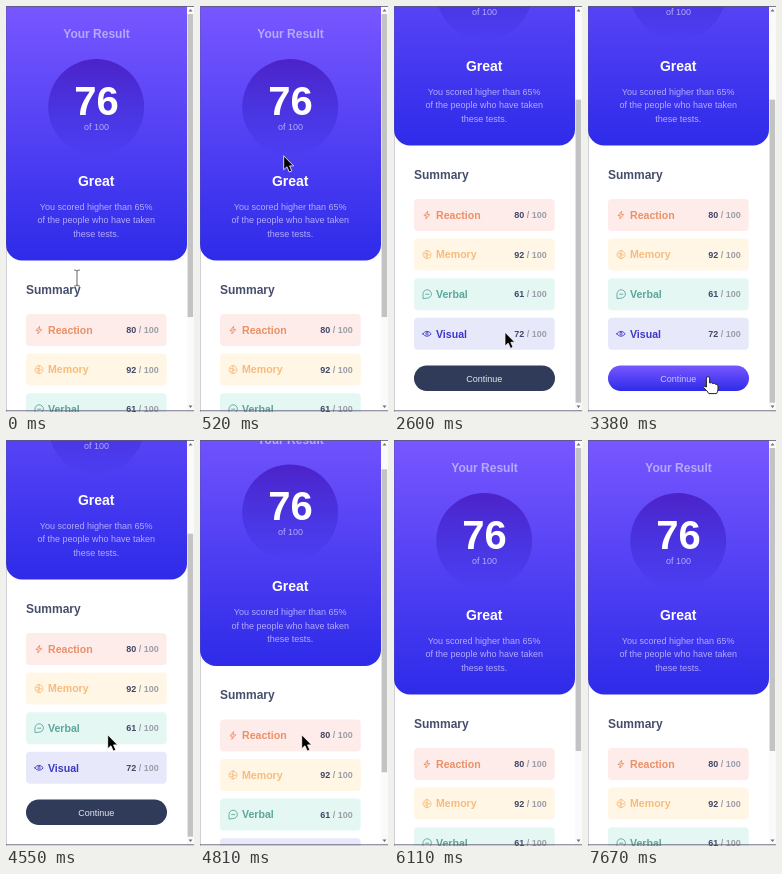
These frames come from a looping animation (188 by 406 pixels, 7.8 s). An HTML page:

```html
<!DOCTYPE html>
<html lang="en">
<head>
<meta charset="utf-8">
<title>Result summary</title>
<style>
  html, body { margin: 0; width: 100%; height: 100%; overflow: hidden; background: #fff; }
  svg { display: block; width: 100%; height: 100%; }
  text { font-family: "Liberation Sans", Arial, sans-serif; font-size: 9px; }
  .bold { font-weight: bold; }
  .mid { text-anchor: middle; }
  .soft { fill: #b3aaff; }
  .icon { fill: none; stroke-width: .9; stroke-linejoin: round; stroke-linecap: round; }
</style>
</head>
<body>
<svg viewBox="0 0 188 406" xmlns="http://www.w3.org/2000/svg">
  <defs>
    <linearGradient id="hero" x2="0" y2="1">
      <stop stop-color="#7857ff"/><stop offset="1" stop-color="#2e2be9"/>
    </linearGradient>
    <linearGradient id="disc" x2="0" y2="1">
      <stop stop-color="#4d22c9"/><stop offset="1" stop-color="#2521c9" stop-opacity="0"/>
    </linearGradient>
  </defs>

  <g id="page">
    <path d="M0 0H181V238.5a16 16 0 0 1-16 16H16a16 16 0 0 1-16-16Z" fill="url(#hero)"/>
    <text class="bold mid soft" x="90.5" y="32.3" style="font-size:12px">Your Result</text>
    <circle cx="90.2" cy="101" r="48" fill="url(#disc)"/>
    <text class="bold mid" x="90.4" y="108.5" fill="#fff" style="font-size:40px">76</text>
    <text class="mid soft" x="90.5" y="124">of 100</text>
    <text class="bold mid" x="90.2" y="179.8" fill="#fff" style="font-size:14px">Great</text>
    <g class="mid soft">
      <text x="90.2" y="204">You scored higher than 65%</text>
      <text x="90.2" y="217.3">of the people who have taken</text>
      <text x="90.2" y="230.8">these tests.</text>
    </g>
    <text class="bold" x="20" y="287.5" fill="#454e6b" style="font-size:12px">Summary</text>
    <g id="rows"></g>
    <rect id="button" x="20" y="474.5" width="141" height="25.5" rx="12.75"/>
    <text id="label" class="mid" x="90.3" y="490.5">Continue</text>
  </g>

  <rect x="181" width="7" height="406" fill="#fafafa"/>
  <rect id="thumb" x="181.6" width="5.5" height="303" fill="#c3c3c3"/>
  <path d="M182.5 5.5l2-2.5 2 2.5ZM182.5 399.5l2 2.5 2-2.5Z" fill="#707070"/>
  <path d="M0 .4H188M0 404.8H188" stroke="#5c5a72" stroke-width=".9"/>
  <path d="M.3 0V406" stroke="#5c5a72" stroke-width=".6" opacity=".6"/>

  <g id="cursor">
    <path id="arrow" transform="translate(.7 .8) scale(.9)" d="M0 0V15.5L3.6 12.2 6.2 18 9 16.8 6.5 11.2H11Z" fill="#000" stroke="#fff" stroke-width=".9"/>
    <path id="beam" d="M-3-8Q0-8 0-6.5Q0-8 3-8M0-6.5V6.5M-3 8Q0 8 0 6.5Q0 8 3 8" fill="none" stroke="#72727c" stroke-width="1.1"/>
    <path id="hand" d="M-1.6 10V1.2a1.6 1.6 0 0 1 3.2 0V6Q3.6 5 4.6 6.5Q6.6 5.6 7.5 7.2Q10 6.8 10 9V12Q10 14.2 8.6 16.6H.8Q-.8 13.6-4.4 10.6Q-4.2 8.4-1.6 10Z" fill="#fff" stroke="#222"/>
  </g>
</svg>
<script>
const LOOP = 7800, TICK = 130;
const $ = id => document.getElementById(id);

const rows = [
  ["Reaction", 80, "#fdecea", "#ec9065", "M33.6 320.4L30 324.6H32.3L31.8 328L35.8 323.4H33.3Z"],
  ["Memory", 92, "#fff6e6", "#f7bc7c", "M33 320a4 4 0 1 0 .1 0ZM33 320V328M30.5 323H33M30.8 325.5H33M33 324.3H35.6"],
  ["Verbal", 61, "#e4f7f3", "#5ca69c", "M29 328V324a4.2 4.2 0 1 1 4.2 4ZM31.6 324H34.8"],
  ["Visual", 72, "#e7e9fb", "#3d38c6", "M28.8 324Q33 318.8 37.2 324Q33 329.2 28.8 324ZM33 322.8a1.2 1.2 0 1 0 .1 0Z"]
];

$("rows").innerHTML = rows.map(([name, score, tint, color, icon], i) => `
  <g transform="translate(0 ${i * 39.6})">
    <rect x="20" y="308" width="140.7" height="32" rx="4" fill="${tint}"/>
    <path class="icon" d="${icon}" stroke="${color}"/>
    <text class="bold" x="42" y="327.8" fill="${color}" style="font-size:10.6px">${name}</text>
    <text class="bold" x="152.8" y="327.1" text-anchor="end" fill="#424866">${score}<tspan fill="#9c9ea8"> / 100</tspan></text>
  </g>`).join("");

// Keys are [time, ...values].
const scrollKeys = [
  [650, 0], [780, 45], [910, 98], [1040, 115],
  [4550, 115], [4680, 80], [4810, 28.6], [4940, 5], [5070, 0]
];
const cursorKeys = [
  [0, 71, 272], [520, 83, 149], [1950, 83, 149], [2860, 117, 369],
  [3120, 117, 369], [3380, 120, 371], [3900, 122, 370],
  [4420, 101, 294], [5330, 101, 294], [5980, 92, 425]
];

const linear = u => u;
const smooth = u => u * u * (3 - 2 * u);

function sample(keys, t, ease) {
  const next = keys.findIndex(k => k[0] > t);
  if (next === 0) return keys[0].slice(1);
  if (next < 0) return keys.at(-1).slice(1);
  const a = keys[next - 1], b = keys[next];
  const u = ease((t - a[0]) / (b[0] - a[0]));
  return a.slice(1).map((v, i) => v + (b[i + 1] - v) * u);
}

function cursorShape(x, y, hover) {
  if (hover) return "hand";
  const overTitle = x > 20 && x < 75 && y > 265 && y < 291;
  return overTitle ? "beam" : "arrow";
}

function draw(t) {
  const [scroll] = sample(scrollKeys, t, linear);
  const [x, y] = sample(cursorKeys, t, smooth);
  const pageY = y + scroll;
  const hover = x > 20 && x < 161 && pageY > 474 && pageY < 500;
  const shape = cursorShape(x, pageY, hover);

  $("page").setAttribute("transform", `translate(0 ${-scroll})`);
  $("thumb").setAttribute("y", 8 + scroll * 0.745);
  $("button").setAttribute("fill", hover ? "url(#hero)" : "#303b59");
  $("label").setAttribute("fill", hover ? "#c9c3ff" : "#e4e6ee");
  $("cursor").setAttribute("transform", `translate(${x} ${y})`);
  for (const id of ["arrow", "beam", "hand"]) {
    $(id).setAttribute("display", id === shape ? "inline" : "none");
  }
}

const start = performance.now();
function frame() {
  const t = (performance.now() - start) % LOOP;
  draw(Math.floor(t / TICK) * TICK);
  requestAnimationFrame(frame);
}
frame();
</script>
</body>
</html>
```
